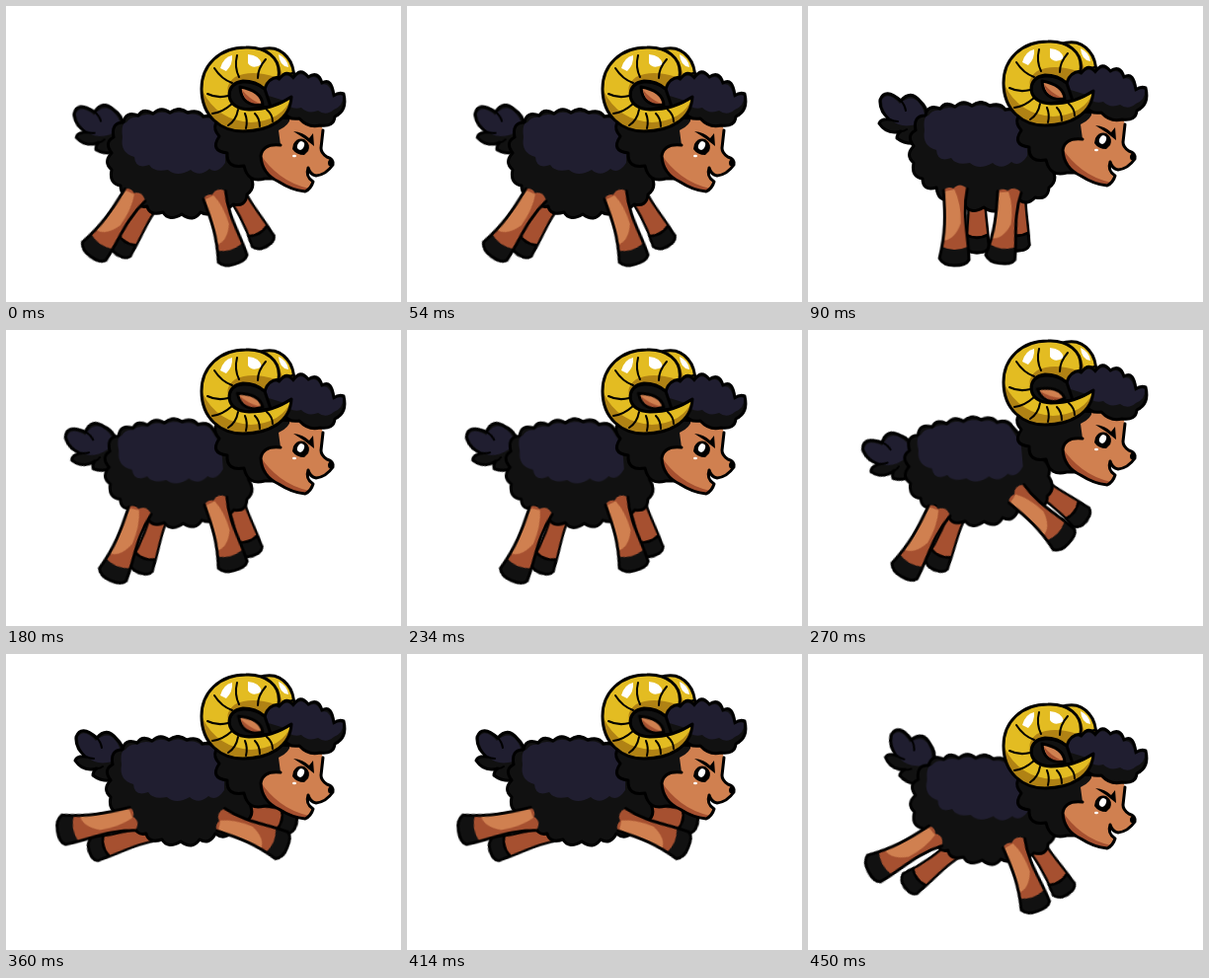
An HTML page without scripts for the animation above (540 ms loop, 400 by 300 pixels).

```html
<!DOCTYPE html>
<html lang="en">
<head>
<meta charset="utf-8">
<title>Running ram</title>
<style>
html, body { margin: 0; width: 100%; height: 100%; overflow: hidden; background: #fff; }
svg { display: block; width: 100vw; height: 100vh; }
path, ellipse { stroke-linejoin: round; stroke-linecap: round; }
.ink { stroke: #000; stroke-width: 3; }
.wool { fill: #111; }
.navy { fill: #201e30; }
.tan { fill: #d08050; }
.rust { fill: #a65030; }
.gold { fill: #e3bc22; }
.ochre { fill: #b08214; }
.white { fill: #fff; }
.line { fill: none; stroke: #000; stroke-width: 2; }

.move { animation: 540ms step-end infinite; }
#head { animation-name: head; }
#ear { animation-name: ear; }
#body { animation-name: body; }
#tail { animation-name: tail; }
#hind { animation-name: hind; }
#hindFar { animation-name: hindFar; }
#fore { animation-name: fore; }
#foreFar { animation-name: foreFar; }

@keyframes head {
  0% { transform: translateY(0); }
  16.66% { transform: translateY(-6px); }
  33.33% { transform: translateY(-22px); }
  50% { transform: translateY(-31px); }
  66.66% { transform: translateY(-21px); }
  83.33% { transform: translateY(9px); }
}
@keyframes ear {
  0%, 16.66% { transform: translate(260px, 100px); }
  33.33% { transform: translate(260px, 100px) rotate(-10deg); }
  50% { transform: translate(260px, 100px) rotate(-20deg); }
  66.66% { transform: translate(260px, 100px) rotate(-5deg); }
  83.33% { transform: translate(260px, 100px); }
}
@keyframes body {
  0% { transform: translate(180px, 161px); }
  16.66% { transform: translate(180px, 154px); }
  33.33% { transform: translate(178px, 146px) rotate(-4deg); }
  50% { transform: translate(176px, 144px) rotate(-5deg); }
  66.66% { transform: translate(179px, 140px); }
  83.33% { transform: translate(181px, 159px) rotate(3deg); }
}
@keyframes tail {
  0% { transform: translate(116px, 129px) rotate(-8deg); }
  16.66% { transform: translate(117px, 121px); }
  33.33% { transform: translate(110px, 120px) rotate(-18deg); }
  50% { transform: translate(106px, 128px) rotate(-23deg); }
  66.66% { transform: translate(115px, 110px); }
  83.33% { transform: translate(122px, 116px) rotate(12deg); }
}
@keyframes hind {
  0% { transform: translate(86px, 253px) rotate(36deg); }
  16.66% { transform: translate(148px, 262px) rotate(1deg); }
  33.33% { transform: translate(106px, 253px) rotate(23deg); }
  50% { transform: translate(95px, 249px) rotate(30deg); }
  66.66% { transform: translate(53px, 179px) rotate(81deg); }
  83.33% { transform: translate(62px, 220px) rotate(62deg); }
}
@keyframes hindFar {
  0% { transform: translate(113px, 251px) rotate(33deg); }
  16.66% { transform: translate(171px, 249px) rotate(0deg); }
  33.33% { transform: translate(135px, 245px) rotate(20deg); }
  50% { transform: translate(128px, 242px) rotate(23deg); }
  66.66% { transform: translate(85px, 199px) rotate(74deg); }
  83.33% { transform: translate(99px, 236px) rotate(53deg); }
}
@keyframes fore {
  0% { transform: translate(231px, 261px) rotate(-16deg); }
  16.66% { transform: translate(194px, 260px) rotate(8deg); }
  33.33% { transform: translate(231px, 243px) rotate(-15deg); }
  50% { transform: translate(263px, 216px) rotate(-46deg); }
  66.66% { transform: translate(284px, 196px) rotate(-67deg); }
  83.33% { transform: translate(232px, 260px) rotate(-19deg); }
}
@keyframes foreFar {
  0% { transform: translate(263px, 243px) rotate(-29deg); }
  16.66% { transform: translate(212px, 247px) rotate(0deg); }
  33.33% { transform: translate(249px, 228px) rotate(-17deg); }
  50% { transform: translate(281px, 193px) rotate(-53deg); }
  66.66% { transform: translate(293px, 172px) rotate(-76deg); }
  83.33% { transform: translate(262px, 243px) rotate(-32deg); }
}
</style>
</head>
<body>
<svg viewBox="0 0 400 300">
  <defs>
    <path id="limb" d="M-12 -75 C-10 -50 -9 -32 -15 -6 Q-11 1 0 1 Q12 1 15 -5 C14 -30 7 -50 12 -77"/>
    <path id="hoof" d="M-13 -18 Q0 -12 13 -18 L15 -5 Q12 1 0 1 Q-11 1 -15 -6Z"/>
    <g id="nearLeg">
      <path class="rust" d="M-12 -75 C-10 -50 -9 -32 -15 -6 L15 -5 C14 -30 7 -50 12 -77 Q4 -84 -2 -77 Q-8 -80 -12 -75Z"/>
      <path class="tan" d="M-11 -74 C-9 -50 -9 -40 -13 -24 Q0 -24 6 -42 Q6 -62 -1 -76Z"/>
      <use href="#hoof" class="wool"/>
      <use href="#limb" class="ink" fill="none"/>
    </g>
    <g id="farLeg" transform="scale(.82 .95)">
      <use href="#limb" class="rust ink"/>
      <use href="#hoof" class="wool ink"/>
    </g>
  </defs>

  <g id="tail" class="move">
    <path class="wool ink" d="M6 14 Q-14 23 -27 13 Q-27 9 -23 6 Q-37 10 -45 -2 Q-43 -7 -34 -6 Q-45 -14 -44 -26 Q-39 -39 -23 -25 Q-13 -37 -3 -24 Q4 -18 4 -8Z"/>
    <path class="navy" d="M-4 -2 Q-22 4 -32 -5 Q-43 -15 -42 -26 Q-36 -35 -24 -22 Q-12 -33 -4 -22 Q1 -16 1 -9Z"/>
    <path class="line" d="M-23 -25 Q-19 -21 -18 -15 M-34 -6 Q-30 -4 -26 -4 M-23 6 Q-20 6 -17 4"/>
  </g>

  <g id="hindFar" class="move"><use href="#farLeg"/></g>
  <g id="foreFar" class="move"><use href="#farLeg"/></g>

  <g id="body" class="move">
    <g transform="translate(-180 -160)">
      <path class="wool ink" d="M107 148 Q99 137 109 132 Q106 117 119 117 Q121 105 134 110 Q139 102 149 108 Q157 100 166 107 Q175 100 184 107 Q195 103 200 111 Q211 108 215 117 L240 150 Q252 158 247 170 Q254 183 244 190 Q243 203 230 200 Q222 209 213 202 Q207 214 197 208 Q190 219 178 210 Q165 218 159 208 Q145 212 143 202 Q132 205 130 190 Q116 194 116 181 Q104 179 107 165 Q98 157 107 148Z"/>
      <path class="navy" d="M118 132 Q116 118 122 117 Q126 111 134 112 Q140 107 149 110 Q157 104 166 109 Q175 104 184 109 Q194 107 199 113 Q209 111 213 118 L222 135 L222 158 Q214 170 206 164 Q196 173 187 165 Q173 173 164 165 Q150 168 145 160 Q131 165 130 152 Q115 148 118 132Z"/>
    </g>
  </g>

  <g id="hind" class="move"><use href="#nearLeg"/></g>
  <g id="fore" class="move"><use href="#nearLeg" transform="scale(1 .95)"/></g>

  <g id="head" class="move">
    <path class="gold ink" d="M255 45 Q274 38 285 52 Q292 60 292 76 L270 80Z"/>
    <path class="ochre" d="M268 54 Q280 60 281 76 L272 78Z"/>
    <path class="white" d="M276 49 Q285 53 286 62 Q277 61 276 49Z"/>
    <path class="line" d="M290 68 L282 70"/>

    <path class="wool ink" d="M225 108 Q204 119 216 132 Q206 147 224 149 Q223 165 241 162 Q245 180 262 175 L290 175 L300 115Z"/>

    <path class="tan" d="M288 113 Q287 121 276 126 L278 141 Q260 139 258 152 Q259 170 276 178 Q290 187 303 188 Q309 185 311 178 Q303 173 306 164 Q308 171 314 172 Q324 171 331 161 Q332 155 325 153 Q319 149 319 144 L321 126 L318 117Z"/>
    <path class="rust" d="M258 151 Q259 170 276 178 Q290 187 303 188 L307 185 Q290 181 278 172 Q266 163 258 151Z"/>
    <path class="ink" fill="none" stroke-width="2.500" d="M278 141 Q260 139 258 152 Q259 170 276 178 Q290 187 303 188 Q309 185 311 178 Q303 173 306 164 Q308 171 314 172 Q324 171 331 161 Q332 155 325 153 Q319 149 319 144 L321 126"/>
    <ellipse cx="329" cy="159" rx="3" ry="3.500"/>
    <path d="M291 127 Q301 128 307 134 L311 129 L312 142 Q303 134 291 127Z"/>
    <path d="M291 140 Q295 133 302 135 Q309 140 306 147 L302 151 Q294 151 290 145Z"/>
    <ellipse class="white" cx="298.500" cy="141.500" rx="3.300" ry="4.500" transform="rotate(25 298.500 141.500)"/>
    <ellipse class="white" cx="292" cy="152" rx="2" ry="1.200"/>

    <path class="wool ink" d="M228 82 L250 78 L262 82 Q266 67 277 74 Q284 63 291 73 Q298 61 306 72 Q316 65 320 78 Q330 72 332 91 Q337 87 342 89 Q346 106 333 112 Q332 123 318 121 Q306 124 297 114 Q286 116 281 107 L232 110Z"/>
    <path class="navy" d="M256 88 L263 84 Q267 70 277 76 Q284 66 291 75 Q298 64 306 74 Q315 68 319 80 Q328 76 331 93 Q337 89 341 91 Q342 101 332 105 Q324 112 316 106 Q306 110 299 103 Q288 106 282 96Z"/>

    <path class="wool ink" d="M262 84 Q252 76 240 77 Q226 78 226 91 Q228 104 242 105 L268 102Z"/>
    <path class="gold" d="M262 84 Q265 73 276 72 C279 52 262 41 243 42 C216 42 198 60 198 84 C198 112 218 127 240 127 C266 127 288 115 289 92 Q270 105 246 105 Q228 104 226 91 Q226 78 240 76 Q253 76 262 84Z"/>
    <path class="ochre" d="M199 86 C199 112 218 127 240 127 C266 127 286 115 289 93 Q280 116 248 118 Q214 116 199 86Z M226 91 Q226 78 240 76 Q253 76 262 84 Q265 73 273 72 Q248 64 232 72 Q221 80 226 91Z"/>
    <path class="white" d="M217 63 Q220 52 229 50 Q230 59 223 66Z M245 49 Q257 50 259 59 Q250 65 245 58Z"/>
    <path class="line" d="M234 50 Q231 62 236 72 M211 63 Q218 74 229 78 M204 89 Q214 94 225 91 M209 109 Q219 108 229 99 M225 121 Q233 116 235 105 M243 124 Q245 116 242 109 M257 122 Q257 114 252 109 M270 117 Q270 110 264 105 M263 54 Q255 63 255 73"/>
    <path class="ink" fill="none" d="M262 84 Q265 73 276 72 C279 52 262 41 243 42 C216 42 198 60 198 84 C198 112 218 127 240 127 C266 127 288 115 289 92 Q270 105 246 105 Q228 104 226 91 Q226 78 240 76 Q253 76 262 84"/>

    <g id="ear" class="move">
      <path class="tan ink" d="M0 0 Q-1 -14 -23 -18 Q-22 2 0 0Z"/>
      <path class="rust" d="M-3 -1 Q-18 0 -21 -15 Q-14 -6 -3 -1Z"/>
    </g>
  </g>
</svg>
</body>
</html>
```
